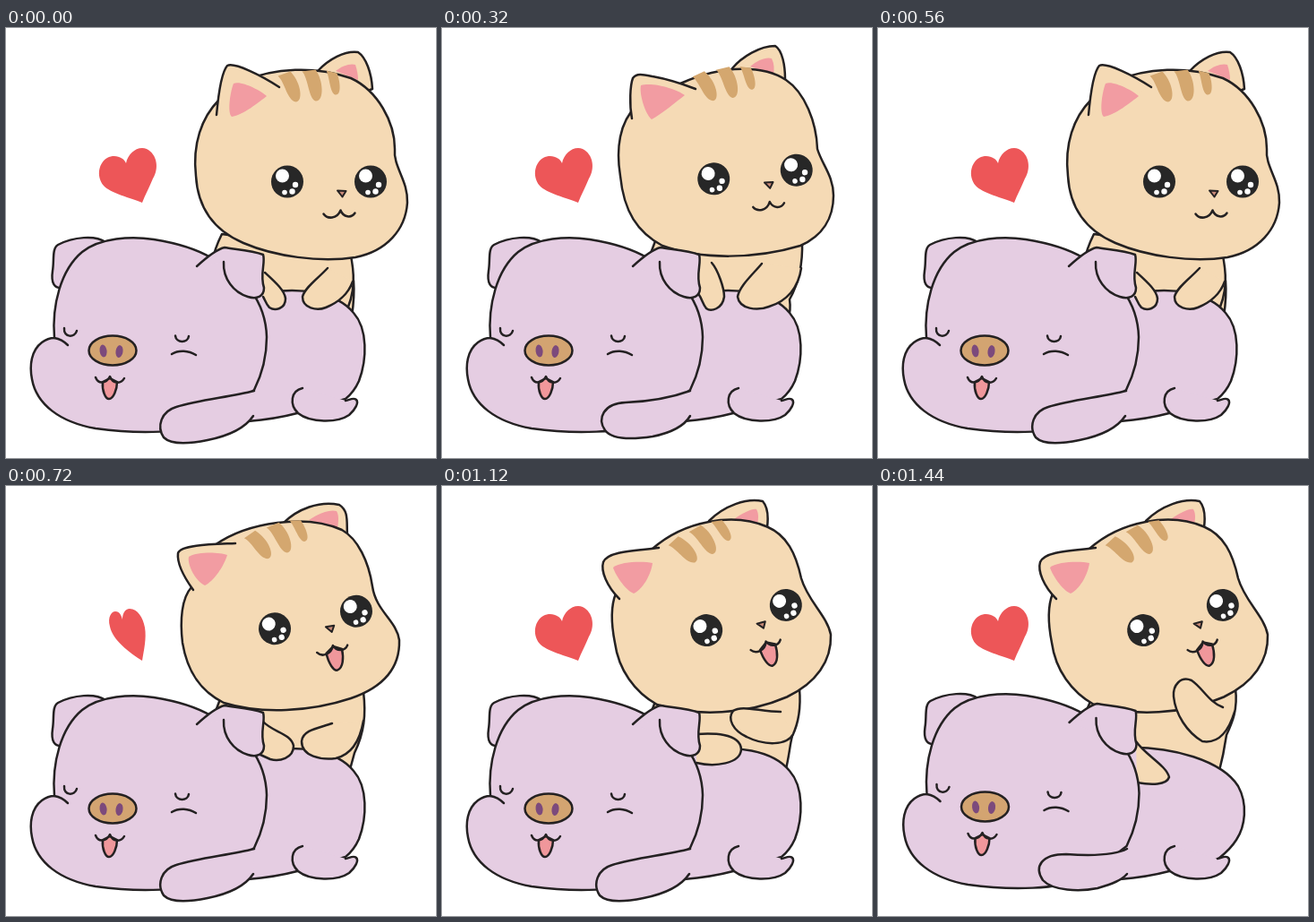
Write an HTML page without scripts that moves like this. It is 480x480 px and loops after 1.52 s.

```html
<!DOCTYPE html>
<html lang="en">
<head>
<meta charset="utf-8">
<title>Cat massaging a pig</title>
<style>
  html, body { margin: 0; height: 100%; overflow: hidden; background: #fff; }
  svg { display: block; width: 100vw; height: 100vh; }
  .cat, .pig, .line { stroke: #242122; stroke-width: 2.5; stroke-linecap: round; stroke-linejoin: round; }
  .cat { fill: #f5dab5; }
  .pig { fill: #e5cde2; }
  .line { fill: none; }
  .pink { fill: #f29ca2; }
  .tan { fill: #d4a76f; }
  .ink { fill: #272727; }
  .shine { fill: #fff; }
  .heart { fill: #ed5658; }
</style>
</head>
<body>
<svg viewBox="0 0 480 480">
<defs>
  <!-- Cat face, centred between the eyes -->
  <g id="eye">
    <circle class="ink" r="18"/>
    <g class="shine">
      <circle cx="-5.500" cy="-6.500" r="7.500"/>
      <circle cx="9" cy="3.500" r="3.200"/>
      <circle cx="5.500" cy="11" r="3.200"/>
      <circle cx="-3" cy="12" r="2.800"/>
    </g>
  </g>
  <g id="face">
    <use href="#eye" x="-46.500"/>
    <use href="#eye" x="46.500"/>
    <path class="line" d="M-6 36C-2 42 9 42 13 32C16 40 25 41 29 35"/>
    <path class="line" style="fill:#c98a78;stroke-width:2" d="M9.500 10L19 10.500L15 17Z"/>
  </g>
  <g id="happy">
    <path class="line" style="fill:#f0979b" d="M4 39C4 51 8 60 12 60C19 59 22 48 22 38L13 33Z"/>
    <use href="#face"/>
  </g>
  <g id="stripes" class="tan">
    <path d="M-57-118C-49-111-47-91-37-89C-29-89-30-109-43-123Z"/>
    <path d="M-30-123C-23-116-23-93-15-90C-5-89-6-113-15-125Z"/>
    <path d="M-3-124C1-116 1-99 7-97C15-96 12-114 9-121Z"/>
  </g>

  <!-- Cat heads, from upright to most tilted -->
  <g id="headA">
    <path class="cat" d="M348 48C360 35 378 25 393 27C402 33 408 50 409 68L380 80Z"/>
    <path class="pink" d="M368 48C375 42 385 39 390 41C392 47 393 53 393 58Z"/>
    <path class="cat" d="M238 80C218 100 208 130 212 165C214 200 230 225 265 240C300 255 350 262 390 256C425 249 446 225 448 195C449 170 432 155 434 135C434 105 415 70 385 56C345 42 300 44 262 60Z"/>
    <use href="#stripes" x="360.500" y="171.500"/>
    <path class="cat" d="M235 97C237 75 240 50 247 42C255 38 285 53 305 66"/>
    <path class="pink" d="M254 62C262 58 285 70 291 76C282 83 265 97 252 99C247 95 250 72 254 62Z"/>
    <use href="#face" x="360.500" y="171.500"/>
  </g>
  <g id="headB">
    <path class="cat" d="M324 45C335 32 355 20 372 20C380 25 383 42 383 57L350 70Z"/>
    <path class="pink" d="M344 43C352 36 362 32 368 34C371 40 371 46 370 52Z"/>
    <path class="cat" d="M217 87C198 105 194 135 199 165C203 205 218 228 246 243C290 259 350 258 400 243C425 232 437 212 437 187C437 165 424 152 419 135C418 105 405 72 384 58C360 42 315 40 266 62Z"/>
    <use href="#stripes" transform="translate(348.500 166) rotate(-6)"/>
    <path class="cat" d="M212 101C209 85 210 64 213 56C217 50 225 52 235 54C252 57 270 63 283 68"/>
    <path class="pink" d="M222 64C235 60 262 68 271 75C262 82 245 96 234 102C226 95 220 72 222 64Z"/>
    <use href="#face" transform="translate(349.500 163.500) rotate(-6)"/>
  </g>
  <g id="headC">
    <path class="cat" d="M310 41C325 26 350 16 372 21C383 28 380 40 381 54L350 70Z"/>
    <path class="pink" d="M338 38C350 30 362 26 369 28C372 33 371 40 370 47Z"/>
    <path class="cat" d="M207 113C196 125 194 150 197 175C202 205 215 228 243 242C285 255 340 252 385 237C420 225 440 205 439 172C436 150 413 140 409 112C405 85 393 59 375 49C335 31 270 40 233 66Z"/>
    <use href="#stripes" transform="translate(351.500 157.500) rotate(-15)"/>
    <path class="cat" d="M209 116C196 98 191 84 192 75C195 65 235 65 256 64"/>
    <path class="pink" d="M204 79C215 73 238 74 247 77C243 90 232 106 222 111C212 107 202 88 204 79Z"/>
    <use href="#happy" transform="translate(345.500 149.500) rotate(-12.100)"/>
  </g>
  <g id="headD">
    <path class="cat" d="M298 39C315 22 340 13 358 17C365 25 364 38 363 46L330 60Z"/>
    <path class="pink" d="M326 37C338 29 346 25 351 26C354 31 353 38 352 42Z"/>
    <path class="cat" d="M194 120C188 135 189 155 193 175C197 205 215 230 240 244C285 258 340 255 385 235.500C418 220 435 195 434 166C430 145 408 128 401 103C395 75 385 55 363 45.500C325 29 270 39 235 70Z"/>
    <use href="#stripes" transform="translate(350.500 153.500) rotate(-22.500)"/>
    <path class="cat" d="M198 126C184 112 177 95 180 85C185 72 220 72 242 69"/>
    <path class="pink" d="M191 91C200 84 225 84 235 86C233 100 224 115 214 120C204 116 193 98 191 91Z"/>
    <use href="#happy" transform="translate(339.500 147) rotate(-17.600)"/>
  </g>

  <!-- Cat torsos, behind the pig -->
  <g id="torsoA" class="cat">
    <path d="M320 322L386 322C388 308 389 295 388 282L370 282Z"/>
    <path d="M241 230C236 240 232 250 230 262L290 320L378 320C391 295 389 272 384 250Z"/>
  </g>
  <path id="torsoB" class="cat" d="M238 238L232 254L290 325L386 325C389 318 389 310 388 303C398 285 403 265 402 238Z"/>
  <path id="torsoC" class="cat" d="M239 238L233 254L290 320L383 320L389 298C400 275 402 255 399 230Z"/>
  <path id="torsoD" class="cat" d="M239 238L233 254L290 320L383 320C388 300 388 290 391 279C398 265 401 250 399 226Z"/>
  <path id="torsoE" class="cat" d="M239 236L233 250L290 325L380 322C385 303 387 292 389 278C395 265 402 250 399 226Z"/>

  <!-- Cat heads with arms, in front of the pig's back -->
  <g id="frontA">
    <use href="#headA"/>
    <path class="cat" d="M289 273C301 284 311 293 312 302C312 314 300 316 294 312C290 308 289 303 287 300"/>
    <path class="cat" d="M359 268C350 278 333 290 331 300C331 313 347 316 357 312C370 307 382 297 387 283"/>
  </g>
  <g id="frontB">
    <use href="#headB"/>
    <path class="cat" d="M301 262C308 270 315 290 315 300C313 314 300 317 295 313C291 308 290 302 287 298"/>
    <path class="cat" d="M357 263C347 275 332 288 330 300C332 314 352 316 365 311C385 305 398 290 401 268"/>
  </g>
  <g id="frontC">
    <use href="#headC"/>
    <path class="cat" d="M287 263C298 275 318 276 321 290C321 304 305 308 295 305L284 300"/>
    <path class="cat" d="M364 265C350 270 331 272 330 285C330 302 352 306 368 304C385 300 395 285 399 262"/>
  </g>
  <g id="frontD">
    <use href="#headD"/>
    <path class="cat" d="M284 277C300 276 333 275 334 294C333 310 305 314 284 309"/>
    <path class="cat" d="M378 252C355 252 335 244 325 251C318 260 325 273 340 280C360 290 385 290 392 277"/>
  </g>
  <g id="frontE">
    <use href="#headD" x="1"/>
    <path class="cat" d="M288 285C298 300 322 312 325 325C322 334 305 334 289 331"/>
    <path class="cat" d="M385 247C370 242 362 225 350 217C338 212 329 222 330 235C332 255 345 275 362 285C380 288 391 275 398 252"/>
  </g>

  <!-- Pig parts -->
  <path id="foot" class="pig" d="M331 402C318 405 316 420 326 430C340 441 370 441 383 432C390 426 394 418 391 415C388 412 384 415 379 416"/>
  <g id="rest">
    <path class="pig" d="M270 300C330 284 372 298 388 318C404 336 403 370 394 394C390 403 384 410 379 414L325 430C310 434 295 437 270 439Z"/>
    <use href="#foot"/>
  </g>
  <g id="rise">
    <path class="pig" d="M270 292C330 289 385 308 402 335C413 355 410 380 400 395C393 406 385 412 380 416L325 430C310 434 295 437 270 439Z"/>
    <use href="#foot"/>
  </g>
  <path id="armLow" class="pig" d="M277 405C250 412 215 415 190 423C173 428 168 445 176 457C185 466 205 464 225 460C250 455 268 445 276 433"/>
  <path id="armMid" class="pig" d="M277 405C255 413 230 417 205 418C180 419 173 436 182 449C190 460 215 459 235 456C255 452 270 445 277 433"/>
  <path id="armHigh" class="pig" d="M278 405C265 412 240 413 210 411C182 411 174 425 184 440C195 452 225 453 245 449C262 444 272 440 278 433"/>

  <path id="wide" class="heart" d="M152 195C140 190 116 184 109 176C100 165 104 150 113 145C122 140 132 145 134 151C136 140 147 131 157 135C169 141 171 157 164 168C160 178 155 187 152 195Z"/>
  <path id="thin" class="heart" d="M152 195C138 186 119 172 116 157C113 146 118 140 122 140C127 140 129 145 130 149C130 142 133 137 138 137C147 137 153 147 155 158C157 170 154 183 152 195Z"/>
</defs>

<rect width="480" height="480" fill="#fff"/>

<use href="#wide">
  <animate attributeName="href" dur="1.52s" repeatCount="indefinite" calcMode="discrete" keyTimes="0;.42105;.68421" values="#wide;#thin;#wide"/>
</use>
<use href="#torsoA">
  <animate attributeName="href" dur="1.52s" repeatCount="indefinite" calcMode="discrete" values="#torsoA;#torsoA;#torsoB;#torsoA;#torsoB;#torsoA;#torsoB;#torsoA;#torsoD;#torsoC;#torsoE;#torsoD;#torsoE;#torsoC;#torsoD;#torsoE;#torsoD;#torsoD;#torsoE"/>
</use>
<use href="#rest">
  <animate attributeName="href" dur="1.52s" repeatCount="indefinite" calcMode="discrete" values="#rest;#rise;#rest;#rise;#rest;#rise;#rest;#rest;#rest;#rest;#rise;#rest;#rise;#rest;#rest;#rise;#rest;#rest;#rise"/>
</use>
<use href="#frontA">
  <animate attributeName="href" dur="1.52s" repeatCount="indefinite" calcMode="discrete" values="#frontA;#frontA;#frontB;#frontA;#frontB;#frontA;#frontB;#frontA;#frontD;#frontC;#frontE;#frontD;#frontE;#frontC;#frontD;#frontE;#frontD;#frontD;#frontE"/>
</use>

<!-- Pig head -->
<g>
  <animateTransform attributeName="transform" type="translate" dur="1.52s" repeatCount="indefinite" calcMode="discrete" values="0 0;.5 -2;0 0;.5 -2;0 0;.5 -2;0 0;0 0;0 0;0 0;.5 -2;0 0;.5 -2;0 0;0 0;.5 -2;0 0;0 0;.5 -2"/>
  <path class="pig" d="M111 239C100 231 75 233 58 242C51 246 54 260 52 271C50 285 54 291 63 290"/>
  <path class="pig" d="M54 346C51 310 61 270 85 250C105 234 140 232 165 236C190 240 215 248 230 257C265 275 290 305 291 345C291 370 284 390 277 404L230 440C200 452 150 454 100 447C60 440 34 420 29 392C26 377 28 360 40 351C44 348 49 346 54 346Z"/>
  <path class="line" d="M54 346C60 347 65 350 69 354"/>
  <path fill="#e5cde2" d="M213 266C225 255 235 247 244 245L250 280Z"/>
  <path class="pig" d="M213 266C225 255 235 247 244 245C255 247 275 248 287 253C290 262 283 275 288 290C288 300 280 303 270 300C254 295 242 280 243 261"/>
  <path class="line" d="M65 335C64 346 77 346 79 338M189 343.500C190 352 203 352 204 344M185 364C193 359 204 360 212 365"/>
  <ellipse class="line" style="fill:#d3a471" cx="119" cy="360" rx="26.500" ry="16.500"/>
  <g fill="#7c4a7c">
    <ellipse cx="108.500" cy="360.500" rx="4" ry="7" transform="rotate(-8 108 360)"/>
    <ellipse cx="126.500" cy="361" rx="4" ry="7" transform="rotate(8 126 361)"/>
  </g>
  <path class="line" style="fill:#f0979b" d="M108 395C107 405 111 414 115 414C120 414 124 403 124 395L116 391Z"/>
  <path class="line" d="M100 390C103 398 112 397 116 389C119 397 128 398 132 391"/>
</g>
<use href="#armLow">
  <animate attributeName="href" dur="1.52s" repeatCount="indefinite" calcMode="discrete" values="#armLow;#armHigh;#armMid;#armHigh;#armMid;#armHigh;#armMid;#armLow;#armLow;#armLow;#armHigh;#armLow;#armHigh;#armLow;#armLow;#armHigh;#armLow;#armMid;#armHigh"/>
</use>
</svg>
</body>
</html>
```
